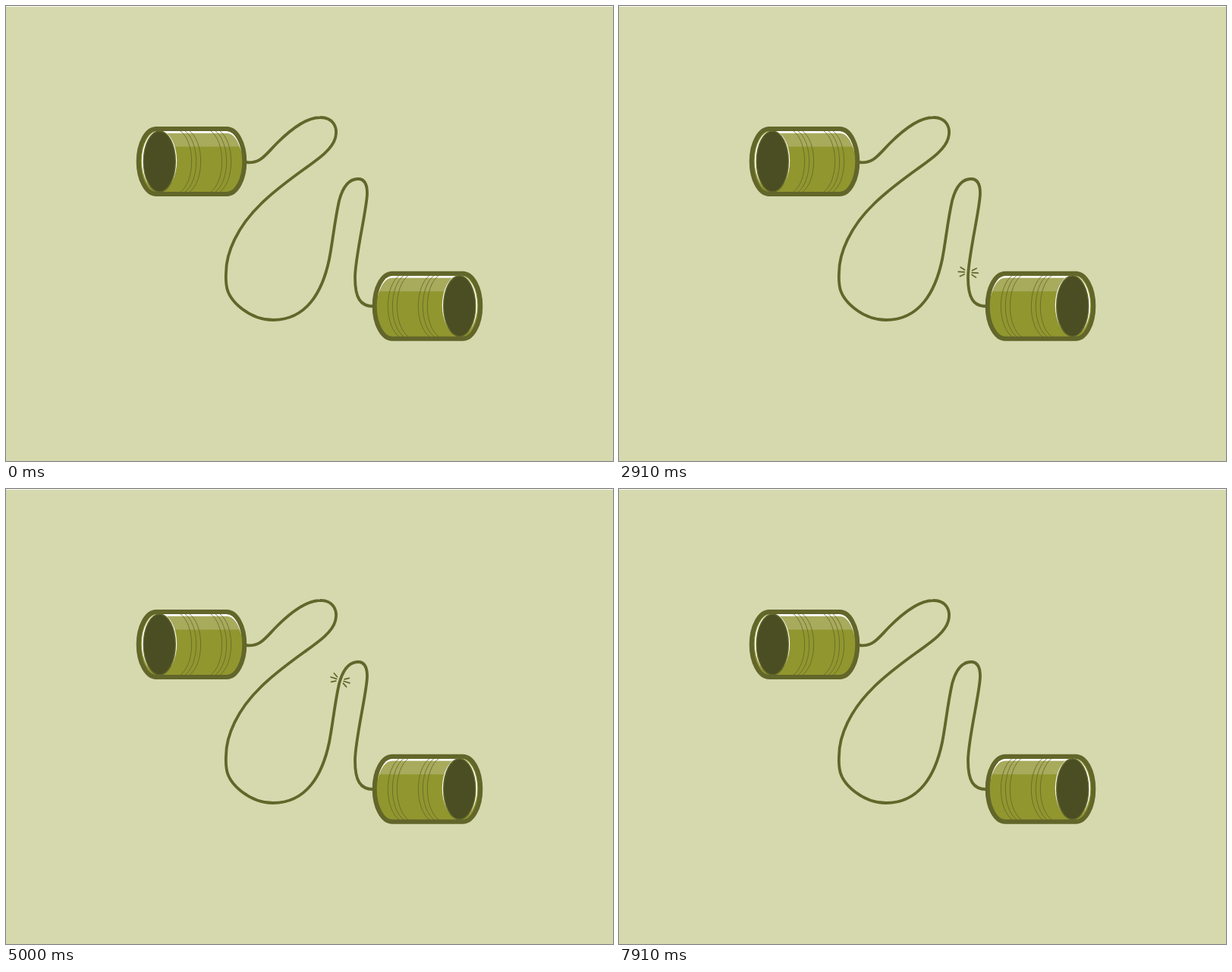
An HTML page that plays this animation: 800 px wide and 600 px high, repeating every 7940 ms.

```html
<!DOCTYPE html>
<html lang="en">
<head>
<meta charset="utf-8">
<title>Tin can telephone</title>
<style>
  html, body { margin: 0; width: 100%; height: 100%; overflow: hidden; background: #d6d9ae; }
  svg { display: block; width: 800px; height: 600px; }
  .line { fill: none; stroke: #62662a; stroke-linecap: round; }
</style>
</head>
<body>
<svg viewBox="0 0 800 600">
  <defs>
    <path id="shell" d="M198 162H291A23.3 43 0 0 1 291 248H198A23.3 43 0 0 1 198 162Z"/>
    <g id="can">
      <use href="#shell" fill="#91962f"/>
      <path d="M205 165H291A20.5 40 0 0 1 309 185.500H205Z" fill="#a8aa5c"/>
      <path d="M206 165H291A20.5 40 0 0 1 310.500 193C306 177 300 168 291 167.700H206Z" fill="#fff"/>
      <g class="line" stroke-width=".8" id="ribs"></g>
      <ellipse cx="202" cy="204" rx="23.200" ry="40" fill="#fff"/>
      <ellipse cx="202.300" cy="205" rx="21" ry="40" fill="#4b4e22" stroke="#62662a" stroke-width="1.500"/>
      <use href="#shell" class="line" stroke-width="6"/>
    </g>
    <g id="rays">
      <path pathLength="1" d="M166 201L144 191"/>
      <path pathLength="1" d="M164 210H139"/>
      <path pathLength="1" d="M166 219L144 229"/>
    </g>
    <path id="burst" d="M0 5V13M2.800 5L6 10.500M-2.800 5L-6 10.500"/>
  </defs>
  <rect width="800" height="600" fill="#d6d9ae"/>
  <rect width="800" height="1" fill="#fbfbf6"/>
  <path id="string" class="line" stroke-width="3.800" d="M300 205L316 206C335 209 342 196 357 181C375 163 395 147 414 147
    C430 146.500 438 159 434 174C430 189 412 201.500 393 215C375 228 352 245 336 261C305 291 290 325 290 352
    Q289.500 361 290.500 368C293 390 322 414 352 414C396 414 417 377 426 334C431 308 433 284 439 257
    C444 238 452 228 464 228C473 228 476 236 476 247C476 266 460 331 460 358C460 385 467 396 484 396L500 396"/>
  <g id="spark" class="line" stroke-width="1.700">
    <use href="#burst"/>
    <use href="#burst" transform="scale(1 -1)"/>
  </g>
  <g>
    <use href="#can" id="leftCan"/>
    <use href="#rays" id="leftRays" class="line" stroke-width="3"/>
  </g>
  <g transform="matrix(-1 0 0 1 800 190.700)">
    <use href="#can" id="rightCan"/>
    <use href="#rays" id="rightRays" class="line" stroke-width="3"/>
  </g>
</svg>
<script>
const LOOP = 7940;
const $ = id => document.getElementById(id);
const clamp = v => Math.max(0, Math.min(1, v));
const string = $('string'), spark = $('spark');
const total = string.getTotalLength();

// Two groups of three curved ribs
for (let i = 0; i < 6; i++) {
  const x = 229 + i % 3 * 6 + (i > 2 ? 40 : 0);
  $('ribs').innerHTML += `<path d="M${x} 164C${x + 21} 178 ${x + 21} 232 ${x} 246"/>`;
}

// Length along the string nearest to a point
function lengthAt(x, y) {
  const distance = s => {
    const p = string.getPointAtLength(s);
    return Math.hypot(p.x - x, p.y - y);
  };
  let best = 0;
  for (let s = 0; s <= total; s++) if (distance(s) < distance(best)) best = s;
  return best;
}

const pass = (time, x, y) => [time, lengthAt(x, y)];

// Each trip runs between the cans, passing a few points on time
const trips = [
  [[330, 8], pass(1320, 336, 261), pass(2730, 476, 241), pass(2910, 460, 351), [3020, total]],
  [[4160, total - 11], pass(5000, 440, 251), pass(6890, 434.5, 162), pass(7370, 372, 168), [7530, 0]]
];

function drawSpark(t) {
  const trip = trips.find(keys => t >= keys[0][0] && t < keys.at(-1)[0]);
  spark.style.display = trip ? '' : 'none';
  if (!trip) return;
  const i = trip.findIndex(key => key[0] > t);
  const [t0, s0] = trip[i - 1], [t1, s1] = trip[i];
  const s = s0 + (s1 - s0) * (t - t0) / (t1 - t0);
  const p = string.getPointAtLength(s);
  const a = string.getPointAtLength(Math.max(0, s - 1));
  const b = string.getPointAtLength(Math.min(total, s + 1));
  const angle = Math.atan2(b.y - a.y, b.x - a.x) * 180 / Math.PI;
  spark.setAttribute('transform', `translate(${p.x} ${p.y}) rotate(${angle})`);
}

// The can jolts as the spark arrives, then the sound leaves its mouth
function drawSound(side, t, arrival, end) {
  const jolt = 3 * Math.sin(Math.PI * clamp((t - arrival) / 390));
  $(side + 'Can').setAttribute('transform', `translate(${-jolt} 0)`);
  const p = (t - end + 420) / 420;
  const rays = $(side + 'Rays');
  rays.style.display = p > 0 && p < 1 ? '' : 'none';
  const head = clamp(p * 2), tail = clamp(p * 2 - 1);
  rays.style.strokeDasharray = `${head - tail} 3`;
  rays.style.strokeDashoffset = -tail;
}

function draw() {
  const t = performance.now() % LOOP;
  drawSpark(t);
  drawSound('right', t, 3000, 3630);
  drawSound('left', t, 7500, 7910);
  requestAnimationFrame(draw);
}
draw();
</script>
</body>
</html>
```
